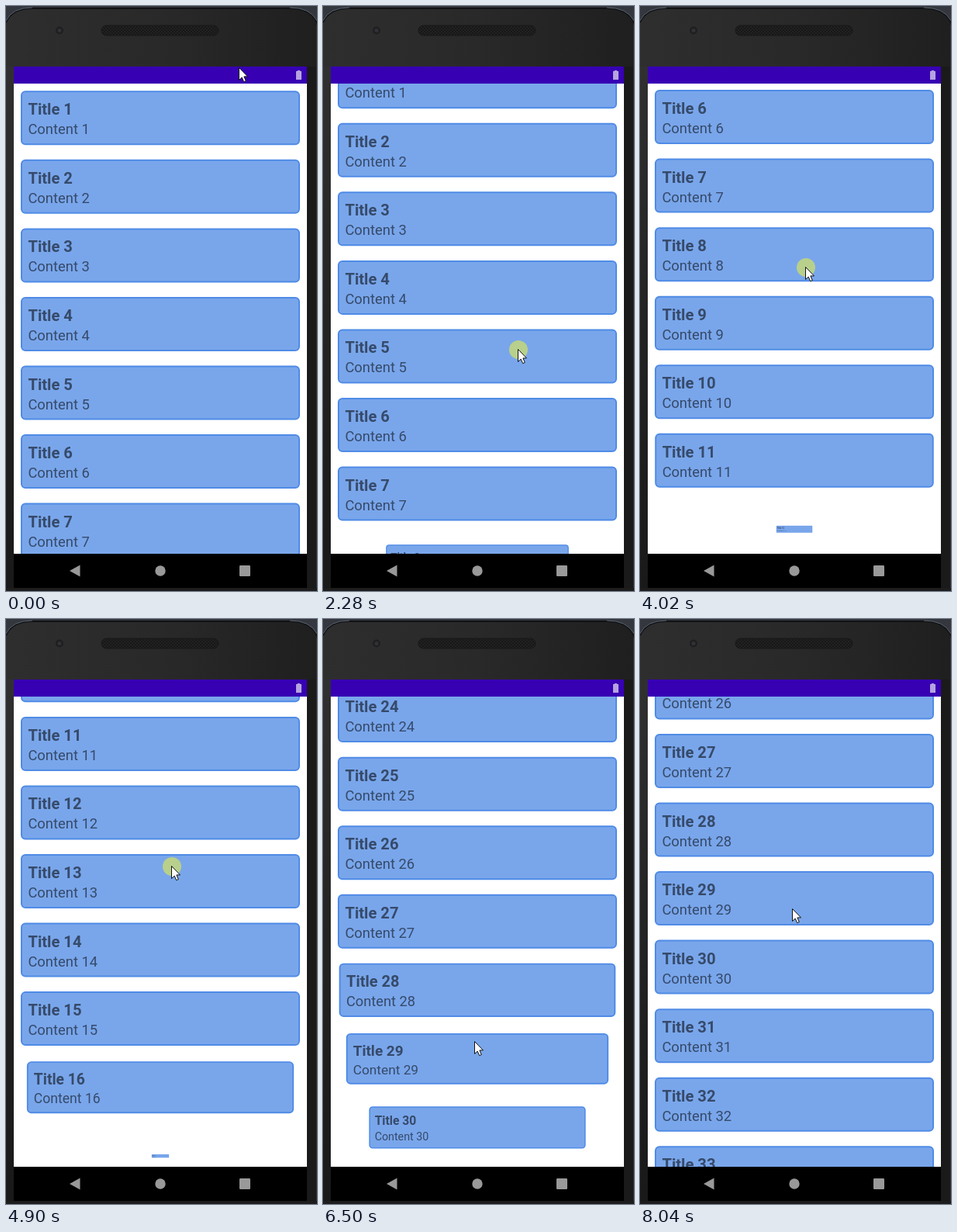
Animation, 401 px wide and 754 px high, one loop 8.38 s. Source, as an HTML page:

```html
<!DOCTYPE html>
<html lang="en">
<head>
<meta charset="utf-8">
<title>Scrolling list with scale-in cards</title>
<style>
html, body { margin: 0; width: 100%; height: 100%; overflow: hidden; background: #202020; }
#stage { position: relative; width: 401px; height: 754px; overflow: hidden; }
#phone, #pointer { position: absolute; left: 0; top: 0; }
#list {
  position: absolute; left: 10px; top: 100px; width: 378px; height: 606px;
  overflow: hidden; background: #fff;
}
.card {
  position: absolute; left: 9px; top: 0; width: 360px; height: 70px;
  box-sizing: border-box; border: 2px solid #4f8be6; border-radius: 6px;
  background: #79a6eb; color: #364a6a; font-family: Roboto, sans-serif;
  white-space: nowrap;
}
.card b, .card span { position: absolute; left: 7.4px; }
.card b { top: 10px; font-size: 20.2px; line-height: 24px; font-weight: 700; }
.card span { top: 37px; font-size: 18.4px; line-height: 22px; }
</style>
</head>
<body>
<div id="stage">
  <svg id="phone" width="401" height="754" viewBox="0 0 401 754">
    <defs>
      <linearGradient id="body" x1="0" y1="0" x2="1" y2="0">
        <stop offset="0" stop-color="#2e2e2e"/>
        <stop offset=".5" stop-color="#292929"/>
        <stop offset="1" stop-color="#1f1f1f"/>
      </linearGradient>
      <linearGradient id="side" x1="0" y1="0" x2="0" y2="1">
        <stop offset="0" stop-color="#303030"/>
        <stop offset=".5" stop-color="#232323"/>
        <stop offset="1" stop-color="#191919"/>
      </linearGradient>
      <pattern id="mesh" width="4" height="4" patternUnits="userSpaceOnUse">
        <rect width="4" height="4" fill="#171717"/>
        <path d="M0 0h2v2h2v2h-2v-2h-2z" fill="#222"/>
      </pattern>
    </defs>
    <rect width="401" height="754" fill="#34373d"/>
    <path d="M0 754V21Q8 3 34 3H366Q392 3 401 21V754Z" fill="url(#body)"/>
    <path d="M0 21Q8 3 34 3H366Q392 3 401 21" fill="none" stroke="#111215" stroke-width="2"/>
    <path d="M0 19Q8 2 34 2M366 2Q392 2 401 19" fill="none" stroke="#5b6472"/>
    <rect y="78" width="10" height="676" fill="url(#side)"/>
    <rect x="388" y="78" width="13" height="676" fill="#1a1a1a"/>
    <path d="M400.5 24V754" stroke="#303236"/>
    <rect y="750" width="401" height="4" fill="#1d1d1d"/>
    <circle cx="69" cy="31.5" r="5" fill="#1f1f20"/>
    <circle cx="69" cy="31.5" r="2.5" fill="#303236"/>
    <rect x="123" y="25" width="151" height="13" rx="6.5" fill="url(#mesh)" stroke="#181818"/>
    <rect x="10" y="78" width="378" height="22" fill="#3700b3"/>
    <path d="M374 84h1.8v-1h3.4v1h1.8v11h-7z" fill="#b5a3df"/>
    <rect x="10" y="706" width="378" height="44" fill="#000"/>
    <g fill="#999">
      <path d="M82 728L95.5 720.5V735.5Z"/>
      <circle cx="199" cy="728" r="6.7"/>
      <rect x="301" y="721" width="14" height="14" rx="1.2"/>
    </g>
  </svg>
  <div id="list"></div>
  <svg id="pointer" width="401" height="754" viewBox="0 0 401 754">
    <g id="hand">
      <circle id="touch" r="12" fill="#ffff20" fill-opacity=".47"/>
      <path transform="translate(-.5 -.5)" d="M0 0V16L3.7 12.6L6.2 18.2L8.8 17L6.4 11.4H11Z" fill="#fff" stroke="#111"/>
    </g>
  </svg>
</div>
<script>
const LOOP = 8380, STEP = 67, LAST = 8040;
const PITCH = 88.55, VIEW = 606, CARDS = 33, GROW = 500;
const FRICTION = 125; // time constant of a fling

const speedUp = u => u ** 1.5;
const slowDown = u => 1 - (1 - u) ** 3;
const smooth = u => u * u * (3 - 2 * u);
const clamp = u => Math.min(1, Math.max(0, u));
const mix = (a, b, u) => a.map((v, i) => v + (b[i] - v) * u);

// The hand is at `from` by `ready`, drags the list to `to`, then lets it fling.
const gestures = [
  { ready: 1400, press: 1740, release: 3440, from: [259, 496], to: [217, 199], drag: 264.4, ease: speedUp },
  { ready: 3660, press: 3702, release: 4242, from: [218, 487.7], to: [209, 154], drag: 333.5, ease: speedUp },
  { ready: 4600, press: 4647, release: 5100, from: [216, 445.7], to: [211, 125], drag: 320.5, ease: speedUp },
  { ready: 5650, press: 5697, release: 6010, from: [204, 670], to: [198, 128], drag: 542.5, ease: speedUp },
  { ready: 6589, press: 7180, release: 7930, from: [196, 574.3], to: [197, 374], drag: 200.3, ease: slowDown }
];

const progress = (g, t) => g.ease(clamp((t - g.press) / (g.release - g.press)));

function fling(g, t) {
  const speed = g.drag * (1 - g.ease(.999)) / .001 / (g.release - g.press);
  return speed * FRICTION * (1 - Math.exp(-Math.max(0, t - g.release) / FRICTION));
}

const scrollAt = t => gestures.reduce((sum, g) => sum + g.drag * progress(g, t) + fling(g, t), 0);

function handAt(t) {
  let at = [301, 80], since = 300;
  for (const g of gestures) {
    if (t < g.press) return mix(at, g.from, smooth(clamp((t - since) / (g.ready - since))));
    if (t < g.release) return mix(g.from, g.to, progress(g, t));
    at = g.to;
    since = g.release;
  }
  return at;
}

// Moment the scroll first brings a row into view
function entryTime(offset) {
  if (offset < 0) return -GROW;
  let t = 0;
  while (t < LOOP && scrollAt(t) < offset) t++;
  return t;
}

const list = document.getElementById('list');
const hand = document.getElementById('hand');
const touch = document.getElementById('touch');

const cards = Array.from({ length: CARDS }, (_, i) => {
  const el = document.createElement('div');
  el.className = 'card';
  el.innerHTML = `<b>Title ${i + 1}</b><span>Content ${i + 1}</span>`;
  list.append(el);
  return { el, top: 9.3 + i * PITCH, born: entryTime(i * PITCH - VIEW) };
});

function render(t) {
  const scroll = scrollAt(t);
  for (const { el, top, born } of cards) {
    const y = top - scroll;
    const scale = (1 - Math.cos(clamp((t - born) / GROW) * Math.PI)) / 2;
    const shown = scale > 0 && y > -80 && y < VIEW;
    el.style.visibility = shown ? 'visible' : 'hidden';
    el.style.transform = `translateY(${y.toFixed(2)}px)` + (scale < 1 ? ` scale(${scale.toFixed(4)})` : '');
  }
  const [x, y] = handAt(t).map(Math.round);
  hand.setAttribute('transform', `translate(${x} ${y})`);
  const held = gestures.some(g => t >= g.press && t < g.release);
  touch.setAttribute('visibility', held ? 'visible' : 'hidden');
}

const start = performance.now();
function tick() {
  const t = (performance.now() - start) % LOOP;
  // The screen refreshes in held steps and rests at the end of the loop
  render(Math.min(LAST, Math.floor((t + 15) / STEP) * STEP));
  requestAnimationFrame(tick);
}
tick();
</script>
</body>
</html>
```
